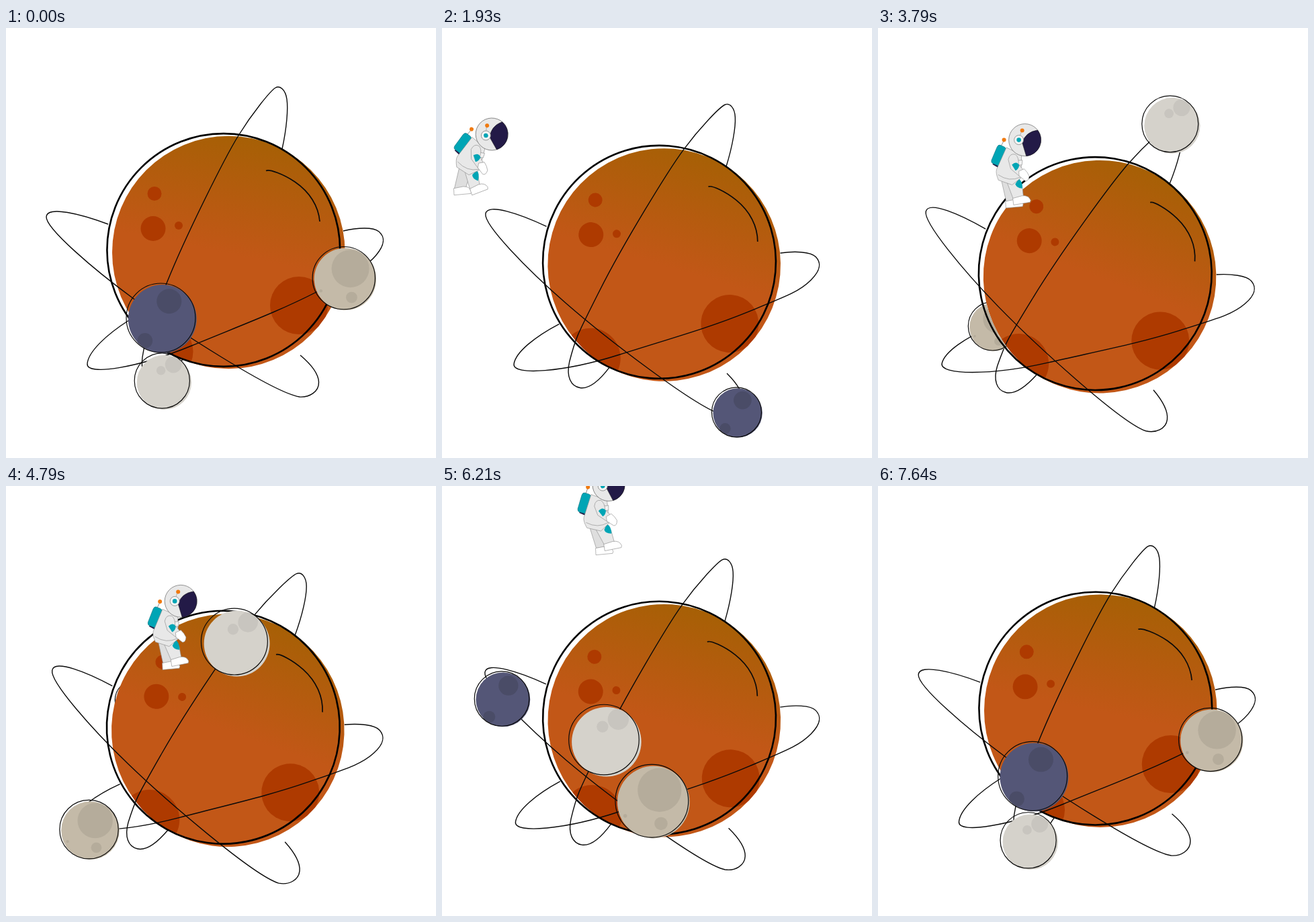
Recreate the animation shown at these times as an HTML page with a canvas. Size 640x640 px, loop 7710 ms.

```html
<!DOCTYPE html>
<html lang="en">
<head>
<meta charset="utf-8">
<title>Planet and moons</title>
<style>
html, body { margin: 0; width: 100%; height: 100%; overflow: hidden; background: #fff; }
canvas { display: block; width: 640px; height: 640px; }
</style>
</head>
<body>
<canvas id="stage"></canvas>
<script>
const LOOP = 7710, STEP = 1000 / 14, PEAK = 3970;
const INK = '#0a0a0a', CX = 331.3, CY = 334, R = 173.3;
const canvas = document.getElementById('stage');
const dpr = window.devicePixelRatio || 1;
canvas.width = canvas.height = 640 * dpr;
const g = canvas.getContext('2d');

const lerp = (a, b, k) => a + (b - a) * k;
const ramp = (t, a, b) => Math.min(1, Math.max(0, (t - a) / (b - a)));
const rad = d => d * Math.PI / 180;

// arc: visible line; back: hidden return; keys: time and place, even speed between.
const orbits = [
  {
    arc: 'M183 435C150 456 122 482 121 500S196 506 276 473 405 422 462 393 536 356 551 338 563 310 555 303 523 297 502 302',
    back: 'C430 318 270 378 183 435',
    keys: [[0, 501, 369], [1140, 490, 302], [5640, 250, 482]],
    size: 56.1, nearest: 6443, shift: [.045, .035], fill: '#c4baa8', mark: '#b5ac9b',
    spots: [[.21, -.3, .6], [.25, .62, .18], [-.73, .41, .05]]
  },
  {
    arc: 'M411 180C418 148 420 120 418 106S408 85 401 89 367 126 346 160 268 308 239 380 209 454 203 490C200 512 208 526 222 527S251 512 263 493',
    back: 'C330 410 395 260 411 180',
    keys: [[0, 233, 526], [5640, 270, 302]],
    size: 56.2, nearest: 5690, shift: [.075, .06], fill: '#d5d2cb', mark: '#c8c5bf',
    spots: [[.41, -.58, .3], [-.04, -.37, .165]]
  },
  {
    arc: 'M152 292C112 277 61 264 60 281S130 359 190 403 398 543 437 549C452 550 466 541 465.5 527S451 498 438 487',
    back: 'C380 435 250 330 152 292',
    keys: [[0, 230.5, 431.5], [1140, 360, 519], [5640, 82, 273], [7640, 230.5, 431.5]],
    size: 51.7, nearest: 7675, shift: [.045, .03], fill: '#545677', mark: '#4a4c67',
    spots: [[.24, -.48, .36], [-.46, .66, .22]]
  }
];

function makePath(d) {
  const p = document.createElementNS('http://www.w3.org/2000/svg', 'path');
  p.setAttribute('d', d);
  return p;
}

function lengthAt(path, len, x, y) {
  let best = 0, min = Infinity;
  for (let s = 0; s < len; s += .5) {
    const p = path.getPointAtLength(s), d = Math.hypot(p.x - x, p.y - y);
    if (d < min) { min = d; best = s; }
  }
  return best;
}

for (const o of orbits) {
  o.line = new Path2D(o.arc);
  o.path = makePath(o.arc + o.back);
  o.len = o.path.getTotalLength();
  o.front = makePath(o.arc).getTotalLength();
  let prev = -Infinity;
  o.track = o.keys.map(([t, x, y]) => {
    let s = lengthAt(o.path, o.len, x, y);
    if (s < prev || (t && s === prev)) s += o.len;
    prev = s;
    return [t, s];
  });
  o.track.push([LOOP, o.track[0][1] + o.len]);
}

function travel(track, t) {
  let i = 0;
  while (i < track.length - 2 && t > track[i + 1][0]) i++;
  const [t0, s0] = track[i], [t1, s1] = track[i + 1];
  return lerp(s0, s1, ramp(t, t0, t1));
}

// The planet sinks and turns 10 degrees, then comes back.
function pose(t) {
  const q = t < PEAK ? t / PEAK : (LOOP - t) / (LOOP - PEAK);
  return { x: CX - 1.3 * q, y: CY + 38 * q, a: rad(10 * q) };
}

function place(p, x, y) {
  const dx = x - CX, dy = y - CY, c = Math.cos(p.a), n = Math.sin(p.a);
  return { x: p.x + dx * c - dy * n, y: p.y + dx * n + dy * c };
}

function enter(p) {
  g.translate(p.x, p.y);
  g.rotate(p.a);
  g.translate(-CX, -CY);
}

function disc(x, y, r, fill, stroke, w) {
  g.beginPath();
  g.arc(x, y, r, 0, 7);
  if (fill) { g.fillStyle = fill; g.fill(); }
  if (stroke) { g.strokeStyle = stroke; g.lineWidth = w; g.stroke(); }
}

function shape(d, fill, stroke = '#8c8c8c', w = .6) {
  const p = new Path2D(d);
  if (fill) { g.fillStyle = fill; g.fill(p); }
  if (stroke) { g.strokeStyle = stroke; g.lineWidth = w; g.stroke(p); }
}

const glow = g.createLinearGradient(362, 160, 326, 335);
glow.addColorStop(0, '#a66005');
glow.addColorStop(1, '#c25717');

function planet() {
  disc(CX, CY, R, glow);
  g.save();
  g.clip();
  for (const [x, y, r] of [[221, 246.5, 10.5], [219, 298.5, 18.5], [257, 294, 6], [436, 413, 43], [234, 481.5, 44.5]])
    disc(x, y, r, '#ae3a00');
  g.restore();
  shape('M387 212.5C392 210 412 217 430 229C452 244 465 265 467 288', null, INK, 1.7);
  for (const o of orbits) {
    g.strokeStyle = INK;
    g.lineWidth = 1.4;
    g.stroke(o.line);
  }
}

function moonState(o, t, p) {
  const s = travel(o.track, t) % o.len;
  const pt = o.path.getPointAtLength(s);
  const d = Math.abs(t - o.nearest), far = Math.min(d, LOOP - d) / (LOOP / 2);
  return {
    o, ...place(p, pt.x, pt.y), r: o.size - 28.8 * far,
    behind: s < 85 || s > o.front - 65
  };
}

function moon({ o, x, y, r }) {
  g.save();
  disc(x + o.shift[0] * r, y + o.shift[1] * r, r * .99, o.fill);
  g.clip();
  for (const [sx, sy, sr] of o.spots) disc(x + sx * r, y + sy * r, sr * r, o.mark);
  g.restore();
  disc(x, y, r, null, INK, 1.2);
}

const SUIT = '#e8e8e8', TEAL = '#00a5b5', NAVY = '#231a47', ORANGE = '#f07a10';

function boot(x, y, turn) {
  g.save();
  g.translate(x, y);
  g.rotate(rad(turn));
  shape('M0 0L14 -2Q24 -2 26 6L25 9L0 10Z', '#fff');
  g.restore();
}

function body(swing, lean) {
  shape('M-36 8L-31 -1', null, '#777', .8);
  disc(-31, -1.5, 3, ORANGE);
  shape('M-49 33L-41 38', null, NAVY, 3);
  shape('M-42 9Q-40 5 -37 6L-31 9Q-28 11 -29 14L-36 34Q-38 38 -41 37L-49 33Q-52 32 -51 28Z', TEAL, '#137480');

  const rear = -34 + swing, fore = -21 - swing * .7;
  shape(`M-38 56L-20 60L${rear + 17} 90L${rear + 1} 90Z`, '#dedede');
  boot(rear, 90, -3 - lean);
  shape(`M-30 60L-12 56L-7 68L${fore + 16} 85L${fore + 1} 88Z`, SUIT);
  shape('M-12 57Q-6 61 -7 72Q-16 71 -17 65Z', TEAL, null);
  boot(fore, 86, -9 + swing * 1.5 - lean);

  shape('M-28 10L-44 42Q-46 47 -42 58L-22 66L-8 56L-6 22Z', SUIT);
  shape('M-42 50Q-26 62 -9 55', null);
  shape('M-12 30L-5 30L-6 37L-13 37Z', '#f2f2f2');
  disc(-11, 41, 1.2, TEAL);
  disc(-11, 46, 1.2, TEAL);
  shape('M-26 28Q-23 18 -15 21Q-10 25 -11 36L-3 46L-10 54L-23 42Z', SUIT);
  shape('M-21 36Q-14 30 -10 37Q-11 43 -16 45Z', TEAL, null);
  shape('M-11 46L-3 43Q2 48 4 54Q3 62 -2 61L-11 53Z', '#fff');
}

function head() {
  disc(0, 0, 24, SUIT, '#666', .7);
  shape('M-4 4Q1 -12 19 -14.5A24 24 0 0 1 2 24Z', NAVY, '#111', .5);
  disc(-9, 0, 7, '#f4f4f4', '#777', .7);
  disc(-9, 0, 3.3, TEAL);
  shape('M-7 -7L-5 -13', null, '#999', .7);
  disc(-4, -14, 3, ORANGE);
}

// Drifts in upright from a dive, rides the planet, then shoots up.
function astronaut(t, p) {
  if (t < 500 || t > 6500) return;
  const dive = 1 - ramp(t, 500, 2710);
  const land = ramp(t, 2710, 4420);
  const off = ramp(t, 5450, 5640);
  const spot = place(p, 235.7, 153);
  const lift = .00028 * Math.max(0, t - 5450) ** 2;
  const x = Math.min(spot.x, -37 + .0778 * (t - 500));
  const y = lerp(146 + 34 * dive, spot.y, land * land * (3 - 2 * land)) - lift;
  const lean = 31 * dive - 4 * land - 5 * off;
  const swing = -7 * Math.cos((t - 2710) / 134) * (1 - ramp(t, 4200, 4420));

  g.save();
  g.translate(x, y);
  g.save();
  g.rotate(rad(lean));
  body(swing, lean);
  g.restore();
  g.rotate(rad(-36 * dive - 11 * off));
  head();
  g.restore();
}

function draw(t) {
  g.setTransform(dpr, 0, 0, dpr, 0, 0);
  g.fillStyle = '#fff';
  g.fillRect(0, 0, 640, 640);
  const p = pose(t);
  const moons = orbits.map(o => moonState(o, t, p));

  g.save();
  enter(p);
  planet();
  g.restore();

  // Far moons show only outside the planet's disc.
  g.save();
  g.beginPath();
  g.rect(0, 0, 640, 640);
  g.moveTo(p.x + R, p.y);
  g.arc(p.x, p.y, R, 0, Math.PI * 2);
  g.clip('evenodd');
  moons.filter(m => m.behind).forEach(moon);
  g.restore();

  g.save();
  enter(p);
  disc(323.8, 330.5, 173.4, null, '#000', 2.6);
  g.restore();

  moons.filter(m => !m.behind).forEach(moon);
  astronaut(t, p);
}

const start = performance.now();
function tick() {
  const t = (performance.now() - start) % LOOP;
  draw(Math.floor((t + 20) / STEP) * STEP % LOOP);
  requestAnimationFrame(tick);
}
tick();
</script>
</body>
</html>
```
